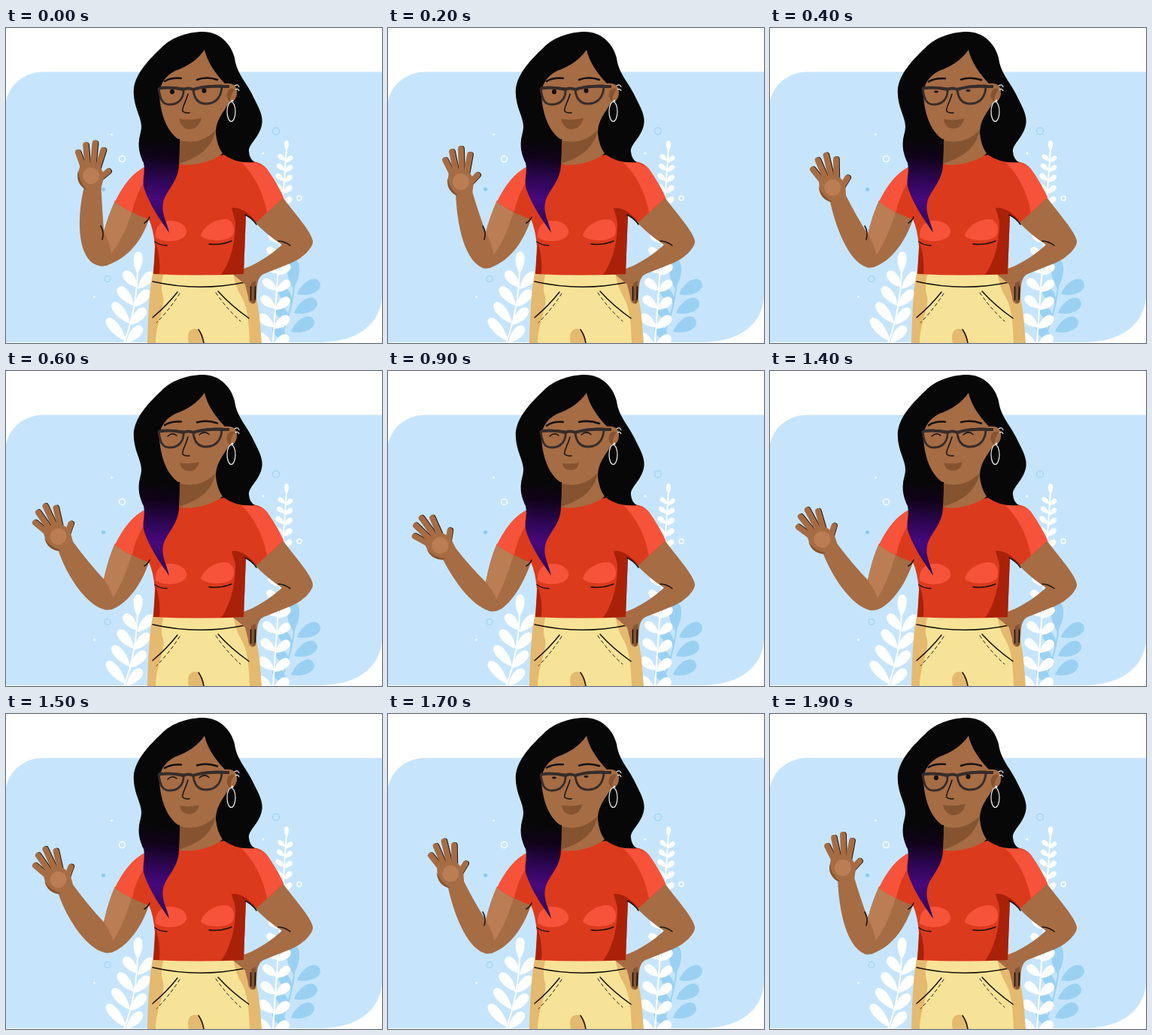
An HTML page that plays this animation: 500 px wide and 420 px high, repeating every 2 s.

```html
<!DOCTYPE html>
<html lang="en">
<head>
<meta charset="utf-8">
<title>Waving woman</title>
<style>
html, body { margin: 0; width: 100%; height: 100%; overflow: hidden; background: #fff; }
svg { display: block; width: 500px; height: 420px; }
.skin { fill: #a66c44; }
.shade { fill: #85532f; }
.glow { fill: #bb7d54; }
.line { fill: none; stroke: #15100f; stroke-width: 1.5; stroke-linecap: round; }
.thin { stroke-width: 1; stroke-dasharray: 4 4; }
.bold { stroke-width: 2.5; }
.lit { fill: #f7533b; }
.dark { fill: #a92109; }
</style>
</head>
<body>
<svg viewBox="0 0 500 420">
  <defs>
    <linearGradient id="strand" gradientUnits="userSpaceOnUse" x1="212" y1="148" x2="202" y2="272">
      <stop offset="0" stop-color="#070708"/>
      <stop offset=".2" stop-color="#100319"/>
      <stop offset=".45" stop-color="#2f0657"/>
      <stop offset=".65" stop-color="#48097c"/>
      <stop offset="1" stop-color="#2a0a50"/>
    </linearGradient>
  </defs>
  <path fill="#c6e5fc" d="M0 98C4 76 24 58.500 50 58.500H500V358C498 393 470 418 420 419H0Z"/>
  <g fill="none" stroke="#fff" stroke-width="1.4">
    <circle cx="359" cy="137.500" r="4.500" stroke="#a3d4f2"/>
    <circle cx="390" cy="227" r="3"/>
    <circle cx="154.500" cy="174.500" r="4"/>
    <circle cx="135" cy="334.500" r="4" stroke="#a3d4f2"/>
  </g>
  <circle cx="129.500" cy="215" r="2.600" fill="#8fc8ec"/>
  <g fill="#fff">
    <circle cx="140.500" cy="142" r="1.300"/>
    <circle cx="117.500" cy="358.500" r="1.300"/>
    <circle cx="342" cy="167" r="1.500"/>
  </g>
  <g id="plants"></g>

  <!-- arm on the hip -->
  <path class="skin" d="M330 258L366 223C384 248 406 271 408 284C409 292 396 306 380 313L340 329L306 326C335 314 352 303 367 289Q347 276 330 258Z"/>
  <path class="line" d="M362 284Q370 284 378 290"/>

  <!-- waving arm -->
  <path id="upper" class="skin"/>
  <path id="glow" class="glow"/>
  <path id="fore" class="skin"/>
  <path class="line" id="crease"/>
  <g id="hand"></g>

  <!-- trousers -->
  <path fill="#e4b970" d="M196 322H317L327 340C337 365 338 395 340 420H188C189 385 190 350 196 322Z"/>
  <path fill="#f7e397" d="M211 322H302Q304 345 314 360C322 375 323 395 324 420H264Q262 402 252 401C242 401 241 410 243 420H199C199 395 212 372 209 358Q204 345 211 322Z"/>
  <g class="line">
    <path d="M195 338Q256 352 318 339"/>
    <path d="M228 352Q214 370 195 386M282 351Q299 370 323 387"/>
    <path class="thin" d="M231 354Q217 376 200 393M279 353Q294 375 312 391"/>
    <path d="M256 402Q261 409 263 420"/>
  </g>

  <!-- hand on the hip -->
  <path class="skin" d="M300 327C312 322 325 317 345 313L342 328C331 335 335 350 332 365C329 370 322 368 322 358L318 342Q309 334 300 327Z"/>
  <path class="shade" d="M326 340L332 337C332 345 334 356 332 365C329 370 326 366 326 358Z"/>
  <path class="line" d="M325.500 345V363M331.500 345L331 362"/>

  <!-- shirt -->
  <path fill="#dc3a1c" d="M187 184Q212 180 231 174L280 164Q300 174 328 178Q340 179 347 188Q361 208 369 226L333 259L319 249L316 328Q257 331 196 328L198 291Q196 268 190 255Q166 247 145 232C155 211 168 193 187 184Z"/>
  <path class="lit" d="M187 184C168 193 155 211 145 232Q157 241 168 245Q172 222 187 200Z"/>
  <path class="lit" d="M312 178Q338 178 347 188Q361 208 369 226L347 246Q339 204 312 178Z"/>
  <path class="dark" d="M333 259L319 249L316 328L286 329C298 312 304 290 305 265C306 256 302 249 300 240Q316 238 333 259Z"/>
  <path class="dark" d="M199 286Q206 307 204 328H196Z"/>
  <path class="lit" d="M199 279C198 264 207 257 218 257C233 257 241 265 240 273C238 285 211 288 199 279Z"/>
  <path class="lit" d="M259 277C262 264 279 254 293 255C302 257 305 267 302 275C298 285 268 286 259 277Z"/>
  <path class="line" d="M198 285Q205 290 214 290M270 288Q285 290 300 284M318 249Q328 254 333 262M191 252Q189 257 184 260"/>

  <!-- head -->
  <path fill="#070708" d="M262 5C283 5 299 20 304 40C307 62 320 72 329 92C336 106 343 118 340 130C336 147 322 155 323 165Q324 175 331 179Q306 181 290 169L230 178L182 178Q177 165 177 156C176 146 180 140 180 131C180 118 168 103 170 80C173 60 190 42 207 26C218 14 240 5 262 5Z"/>
  <path class="skin" d="M264 29Q269 51 291 74Q306 72 307 84Q308 97 296 100C288 115 279 122 279 141Q281 158 288 167C277 178 244 186 230 181L232 150C215 140 206 118 204 90Q204 68 225 57Q251 48 264 29Z"/>
  <path class="shade" d="M231 150Q258 157 279 136C273 161 257 172 230 181Z"/>
  <path class="shade" d="M298 99Q291 92 295 84Q300 78 304 82Q299 87 298 99Z"/>
  <path fill="url(#strand)" d="M178 146C175 157 177 167 183 180C186 192 180 203 184 215C192 237 203 253 217 273C214 258 206 247 209 233C212 217 230 205 230 181L231 148Z"/>
  <g fill="none" stroke="#f4f4f4" stroke-width="1.2">
    <ellipse cx="299.500" cy="111.500" rx="5.500" ry="13"/>
    <path d="M304 77Q309 74 310 79M305 82Q309 80 310 84"/>
  </g>
  <circle cx="301" cy="97" r="1.600" fill="#eee"/>
  <path id="mouth" class="shade"/>
  <path class="line" d="M242 88C239 99 233 108 235 111Q238 114 244 113"/>
  <path class="line bold" id="brows"/>
  <g id="eyes" fill="#141010">
    <ellipse cx="221" cy="85" rx="3"/>
    <ellipse cx="263.500" cy="83.500" rx="3"/>
  </g>
  <path class="line" id="lids" d="M215 87Q221 81 227 86M257 85Q264 79 270 84.500"/>
  <g fill="none" stroke="#352c2a" stroke-width="2.800" stroke-linejoin="round">
    <path d="M203 81Q218 78 236 81C237 92 231 102 218 102C207 102 205 94 203 81Z"/>
    <path d="M249 82Q264 77 287 77C287 88 282 101 266 101C254 101 250 93 249 82Z"/>
    <path d="M236 82Q242 79 249 82M287 78H297M203 80.500Q218 78 236 82M249 82Q264 77 288 78" stroke-width="4"/>
  </g>
</svg>
<script>
const $ = id => document.getElementById(id);

function leaf(x, y, angle, len, w = len * .34) {
  return `<path transform="translate(${x} ${y}) rotate(${angle})" d="M0 0C${-w} ${-len * .4} ${-w} ${-len} 0 ${-len}C${w} ${-len} ${w} ${-len * .4} 0 0Z"/>`;
}
const stem = (d, color) => `<path d="${d}" fill="none" stroke="${color}" stroke-width="2"/>`;

function drawPlants() {
  const blue = '#9ad1f2';
  let s = `<g fill="${blue}">` + stem('M384 335Q382 375 362 420', blue) + leaf(382, 347, 0, 39, 11);
  for (let i = 0; i < 3; i++) {
    const x = 387 - i * 4, y = 355 + i * 25;
    s += leaf(x, y, 62, 34, 12) + leaf(x - 6, y + 12, -40, 26, 9);
  }
  s += '</g><g fill="#fff">' + stem('M373 160L355 420', '#fff') + leaf(373, 164, 0, 14, 4);
  for (let y = 177, len; y < 430; y += len * 1.05) {
    len = 11 + (y - 155) * .06;
    const x = 373 - (y - 155) * .068;
    s += leaf(x, y, -50, len) + leaf(x, y + 2, 50, len);
  }
  s += stem('M175 320Q174 375 157 420', '#fff') + leaf(175, 327, 2, 29, 8);
  for (let i = 0; i < 4; i++) {
    const x = 175 - i * 5, y = 346 + i * 24;
    s += leaf(x, y, -40, 28 + i * 4, 9) + leaf(x, y + 2, 43, 30, 9);
  }
  $('plants').innerHTML = s + '</g>';
}

function drawHand() {
  const fingers = [[-9, -8, -20, -30], [-5, -12, -11, -41], [2, -12, 1, -45], [8, -10, 13, -37], [8, 6, 23, -10]];
  const bone = ([a, b, c, d], color, dx) =>
    `<path d="M${a + dx} ${b}L${c + dx} ${d}" stroke="${color}" stroke-width="7.800" stroke-linecap="round"/>`;
  $('hand').innerHTML = fingers.map(f => bone(f, '#1c120d', 1) + bone(f, '#a66c44', 0)).join('') +
    `<path class="skin" d="M-15 -14Q0 -22 12 -14Q20 -4 17 8L16 15Q5 19 -6 17Q-17 10 -17 0Z"/>
     <path class="shade" d="M-17 -6Q-14 9 -3 17L-6 17Q-18 10 -17 -6Z"/>
     <ellipse class="glow" cx="1" cy="-1" rx="11" ry="11"/>`;
}

// step, palm x y, hand angle, two outer forearm controls, elbow
const poses = [
  [0, 112, 198, 7, 95, 245, 92, 310, 124, 317],
  [1, 96, 206, 0, 91, 250, 98, 308, 126, 320],
  [5, 69, 222, -23, 82, 278, 110, 314, 131, 318],
  [8, 69, 234, -34, 86, 276, 108, 311, 135, 320],
  [9, 69, 236, -36, 87, 277, 108, 311, 135, 320]
];

function poseAt(step) {
  const i = Math.max(1, poses.findIndex(p => p[0] >= step));
  const a = poses[i - 1], b = poses[i], u = (step - a[0]) / (b[0] - a[0]);
  return a.map((v, j) => v + (b[j] - v) * u);
}

function draw(step) {
  const [, px, py, angle, ax, ay, bx, by, ex, ey] = poseAt(step);
  const r = angle * Math.PI / 180, c = Math.cos(r), s = Math.sin(r);
  const place = (x, y) => [px + x * c - y * s, py + x * s + y * c];
  const [ox, oy] = place(-6, 13), [ix, iy] = place(16, 12);
  const elbow = `${ex} ${ey}`, bend = 271 + step * 1.3;
  const inside = `L118 300L130 ${bend}Q136 250 145 230Z`;
  $('hand').setAttribute('transform', `translate(${px} ${py}) rotate(${angle})`);
  $('upper').setAttribute('d', `M145 230L191 252C183 278 167 ${ey - 14} ${ex + 16} ${ey - 3}Q${ex + 8} ${ey + 2} ${elbow}${inside}`);
  $('glow').setAttribute('d', `M145 230L168 243C160 266 154 290 ${elbow}${inside}`);
  $('fore').setAttribute('d', `M${ox} ${oy}C${ax} ${ay} ${bx} ${by} ${elbow}Q${ex + 8} ${ey + 1} ${ex + 14} ${ey - 3}Q144 298 130 ${bend}Q${(ix + 130) / 2} ${(iy + bend) / 2 + 3} ${ix} ${iy}Z`);
  $('crease').setAttribute('d', step < 4 ? 'M126 264Q131 272 128 282' : '');

  const joy = Math.min(1, Math.max(0, (step - 1) / 7));
  const closed = step >= 4;
  $('lids').style.display = closed ? '' : 'none';
  $('eyes').style.display = closed ? 'none' : '';
  for (const eye of $('eyes').children) eye.setAttribute('ry', step < 2 ? 3.2 : 4.4 - step);
  $('mouth').setAttribute('d', `M${230 + joy * 2} ${121 + joy * 2}Q244 ${124 + joy} ${260 - joy * 6} ${120 + joy * 2}Q${256 - joy * 3} ${135 - joy * 3} 243 ${135 - joy * 3}Q233 ${134 - joy * 2} ${230 + joy * 2} ${121 + joy * 2}Z`);
  $('brows').setAttribute('d', `M211 ${71 + joy * 2}Q219 ${66 + joy} 233 ${67 + joy}M254 ${69 - joy}Q267 ${64 + joy} 281 ${69 + joy}`);
}

function frame() {
  const tick = Math.floor(performance.now() % 2000 / 100);
  draw(tick < 11 ? Math.max(0, tick - 1) : 20 - tick);
  requestAnimationFrame(frame);
}

drawPlants();
drawHand();
frame();
</script>
</body>
</html>
```
